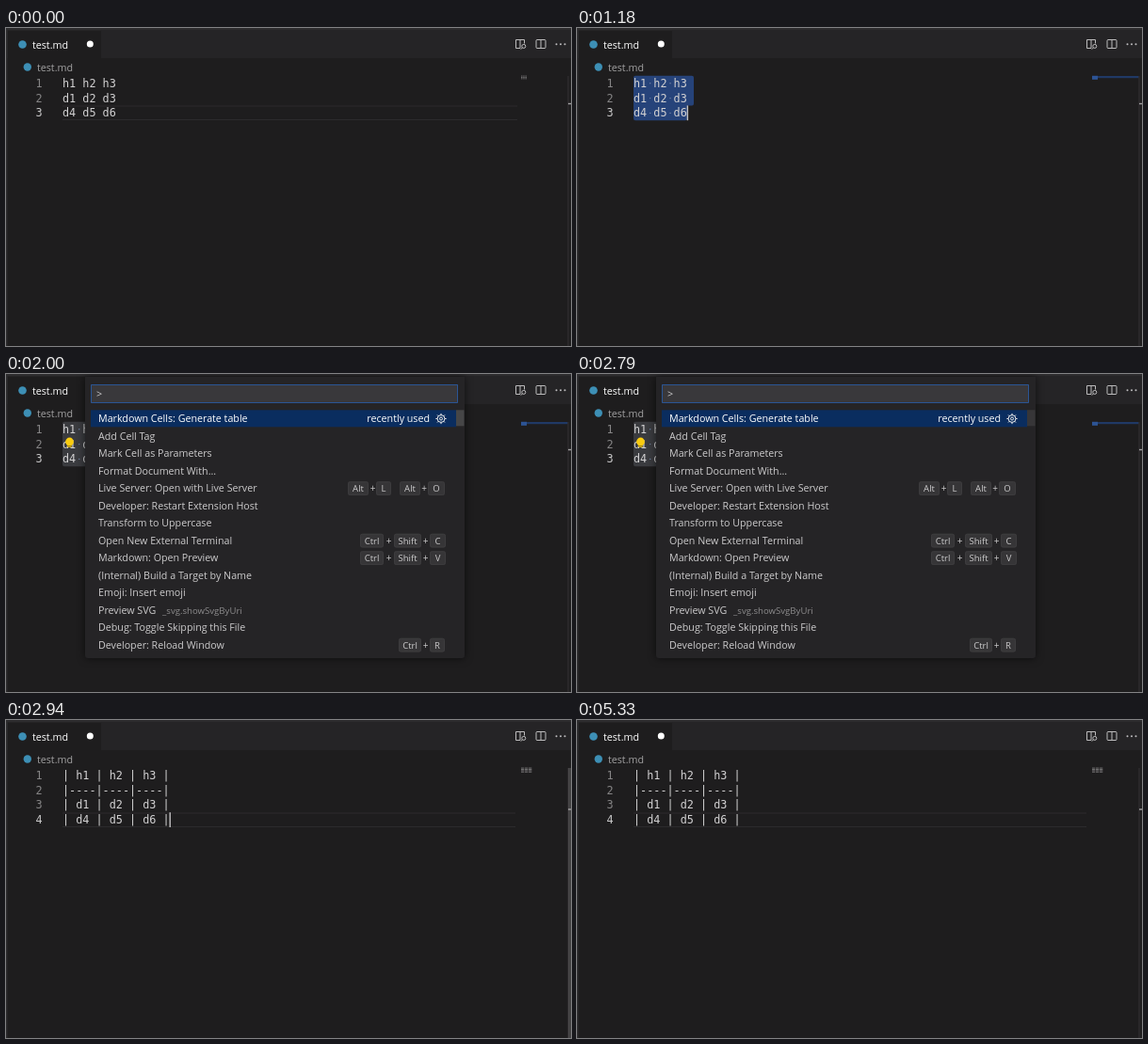
Write an HTML page with a canvas that moves like this. It is 600 px wide and 338 px high and loops after 5.36 s.

```html
<!DOCTYPE html>
<html lang="en">
<head>
<meta charset="utf-8">
<title>Markdown table from text</title>
<style>
  html, body { margin: 0; width: 100%; height: 100%; overflow: hidden; background: #1e1d1e; }
  canvas { display: block; width: 600px; height: 338px; }
</style>
</head>
<body>
<canvas id="stage" width="600" height="338"></canvas>
<script>
const ctx = document.getElementById('stage').getContext('2d');
const LOOP = 5360;
const UI = '"Open Sans", "Noto Sans", sans-serif';
const MONO = '11.8px "DejaVu Sans Mono", "Liberation Mono", monospace';
const LEFT = 60, TOP = 50.8, PITCH = 15.8, CHAR = 7.1;

// Moments of the story, in ms
const SELECT = 1180, BULB = 1910, OPEN = 2000, CLOSE = 2820, TABLE = 2860;
const CARET_ON = [[390, 880], [SELECT, 1700], [TABLE, 3360], [3880, 4360], [4880, 5330]];

const PLAIN = ['h1 h2 h3', 'd1 d2 d3', 'd4 d5 d6'];
const GRID = ['| h1 | h2 | h3 |', '|----|----|----|', '| d1 | d2 | d3 |', '| d4 | d5 | d6 |'];

const COMMANDS = [
  'Markdown Cells: Generate table', 'Add Cell Tag', 'Mark Cell as Parameters',
  'Format Document With...', 'Live Server: Open with Live Server',
  'Developer: Restart Extension Host', 'Transform to Uppercase',
  'Open New External Terminal', 'Markdown: Open Preview',
  '(Internal) Build a Target by Name', 'Emoji: Insert emoji', 'Preview SVG',
  'Debug: Toggle Skipping this File', 'Developer: Reload Window'
];
// Key caps per row: [label, left, width]
const KEYS = {
  4: [['Alt', 363, 22], ['L', 393, 16], ['Alt', 418, 22], ['O', 448, 18]],
  7: [['Ctrl', 376, 25], ['Shift', 412, 29], ['C', 450, 17]],
  8: [['Ctrl', 376, 25], ['Shift', 412, 29], ['V', 450, 17]],
  13: [['Ctrl', 417, 24], ['R', 450, 16]]
};
const PLUSES = { 4: [389.5, 444], 7: [406.5, 445.5], 8: [406.5, 445.5], 13: [445.5] };

const clamp = v => Math.max(0, Math.min(1, v));
const rowTop = i => TOP + PITCH * i;

function rect(x, y, w, h, color) {
  ctx.fillStyle = color;
  ctx.fillRect(x, y, w, h);
}

function box(x, y, w, h, color, r = 0) {
  ctx.strokeStyle = color;
  ctx.lineWidth = 1;
  ctx.beginPath();
  ctx.roundRect(x, y, w, h, r);
  ctx.stroke();
}

function disc(x, y, r, color) {
  ctx.fillStyle = color;
  ctx.beginPath();
  ctx.arc(x, y, r, 0, Math.PI * 2);
  ctx.fill();
}

function line(x1, y1, x2, y2, color) {
  ctx.strokeStyle = color;
  ctx.lineWidth = 1;
  ctx.beginPath();
  ctx.moveTo(x1, y1);
  ctx.lineTo(x2, y2);
  ctx.stroke();
}

function text(str, x, y, color, font, align = 'left') {
  ctx.font = font;
  ctx.textAlign = align;
  ctx.fillStyle = color;
  ctx.fillText(str, x, y);
}

const label = (str, x, y, color, size = 10.7, align) =>
  text(str, x, y, color, size + 'px ' + UI, align);

function drawFrame() {
  rect(0, 0, 600, 338, '#1e1d1e');
  rect(0, 3, 600, 29, '#252426');
  rect(2, 3, 99, 29, '#1e1d1e');
  rect(0, 0, 600, 2.5, '#2d2c2e');
  rect(0, 0, 1.5, 338, '#2d2c2e');

  disc(17.5, 17.5, 4.3, '#3d8fb5');
  label('test.md', 28, 21.5, '#ffffff');
  disc(89.3, 17, 3.5, '#ffffff');
  disc(22.8, 41.5, 4.2, '#3d8fb5');
  label('test.md', 33, 45.7, '#a2a1a2');

  const icon = '#bdbcbd';
  ctx.strokeStyle = icon;
  ctx.lineWidth = 1;
  ctx.beginPath();
  ctx.moveTo(546, 21.5);
  ctx.lineTo(541.5, 21.5);
  ctx.lineTo(541.5, 12.5);
  ctx.lineTo(550.5, 12.5);
  ctx.lineTo(550.5, 16.5);
  ctx.moveTo(546, 12.5);
  ctx.lineTo(546, 21.5);
  ctx.stroke();
  ctx.beginPath();
  ctx.arc(549.8, 19.4, 2, 0, Math.PI * 2);
  ctx.stroke();
  line(548.4, 20.9, 546.8, 22.6, icon);
  box(563, 12.5, 10, 9, icon, 1);
  line(568, 12.5, 568, 21.5, icon);
  for (const x of [584.5, 589, 593.5]) disc(x, 17.2, 1, icon);
}

function drawMinimap(selected, table) {
  if (selected) {
    rect(547, 51, 49.5, 2.2, '#203966');
    rect(547, 50.8, 6, 4, '#2d5495');
    return;
  }
  const groups = table ? 3 : 3;
  const step = table ? 4 : 2.2;
  for (let row = 0; row < (table ? 4 : 3); row++)
    for (let i = 0; i < groups; i++)
      rect(547 + i * step, 50.6 + row * 1.4, step - 0.7, 0.9, '#777677');
}

function drawScrollbar(t, last) {
  rect(596.5, 51, 1, 287, '#343335');
  const shown = clamp((t - TABLE) / 80) * (1 - clamp((t - 3420) / 750));
  if (shown > 0) rect(597, 51, 3, 287, `rgba(121,121,121,${0.4 * shown})`);
  rect(597, last === 3 ? 94.3 : 79.8, 3, 1.4, '#a3a2a3');
}

function drawBulb() {
  disc(67.5, 72, 4.4, '#f8cb10');
  rect(65, 75, 4.6, 2.8, '#f8cb10');
  rect(65, 76.2, 4.6, 0.6, '#6a5a20');
}

function drawEditor(t) {
  const table = t >= TABLE;
  const selected = t >= SELECT && !table;
  const away = t >= OPEN && t < CLOSE;
  const lines = table ? GRID : PLAIN;
  const last = lines.length - 1;

  if (selected) {
    const tint = away ? '#3a3b3f' : '#26437a';
    ctx.fillStyle = tint;
    ctx.beginPath();
    ctx.roundRect(LEFT, TOP, 64, PITCH * 2, [2, 2, 2, 0]);
    ctx.roundRect(LEFT, rowTop(2), 57, PITCH, [0, 0, 2, 2]);
    ctx.fill();
  } else {
    const end = table ? 541 : 543;
    const y = Math.round(rowTop(last));
    rect(LEFT, y + 0.5, end - LEFT, 1, '#2c2b2d');
    rect(LEFT, y + 15, end - LEFT, 1, '#2c2b2d');
  }

  lines.forEach((str, i) => {
    const base = rowTop(i) + 12;
    text(String(i + 1), 38.6, base, i === last ? '#c8c7c8' : '#858485', MONO, 'right');
    [...str].forEach((ch, k) => {
      const x = LEFT + k * CHAR;
      if (ch !== ' ') text(ch, x, base, '#d2d1d2', MONO);
      else if (selected) disc(x + CHAR / 2, base - 4, 0.7, '#7485a6');
    });
  });

  if (selected && t >= BULB) drawBulb();
  if (CARET_ON.some(([a, b]) => t >= a && t < b))
    rect(LEFT + lines[last].length * CHAR - 0.1, rowTop(last), 1.4, PITCH, '#c4c3c4');

  drawMinimap(selected, table);
  drawScrollbar(t, last);
}

function drawGear(x, y) {
  ctx.strokeStyle = '#f0f0f0';
  ctx.lineWidth = 1;
  ctx.beginPath();
  ctx.arc(x, y, 3.9, 0, Math.PI * 2);
  ctx.stroke();
  ctx.beginPath();
  ctx.arc(x, y, 1.5, 0, Math.PI * 2);
  ctx.stroke();
  for (let k = 0; k < 8; k++) {
    const c = Math.cos(k * Math.PI / 4), s = Math.sin(k * Math.PI / 4);
    line(x + c * 4, y + s * 4, x + c * 5.6, y + s * 5.6, '#f0f0f0');
  }
}

function drawKey([name, x, w], y) {
  ctx.fillStyle = '#363537';
  ctx.beginPath();
  ctx.roundRect(x, y - 7.2, w, 14.6, 2);
  ctx.fill();
  box(x + 0.5, y - 6.7, w - 1, 13.6, '#3d3c3e', 2);
  label(name, x + w / 2, y + 3.5, '#cccbcc', 9.5, 'center');
}

function drawPalette(t) {
  ctx.save();
  ctx.shadowColor = 'rgba(0,0,0,0.6)';
  ctx.shadowBlur = 8;
  ctx.fillStyle = '#252426';
  ctx.beginPath();
  ctx.roundRect(84, 3, 403, 299, [0, 0, 3, 3]);
  ctx.fill();
  ctx.restore();

  rect(90, 11, 390, 20, '#39383b');
  box(90.5, 11.5, 389, 19, '#2a5595');
  label('>', 96, 25, '#cccbcc');

  rect(90, 38.3, 388, 18, '#0a2d5f');
  const bar = 1 - clamp((t - 2420) / 800);
  rect(478, 38.3, 8.5, 17, `rgba(121,121,121,${0.4 * bar})`);

  COMMANDS.forEach((name, i) => {
    const y = 47.5 + i * 18.5;
    label(name, 98, y + 3.8, i ? '#cccbcc' : '#ffffff');
    (KEYS[i] || []).forEach(key => drawKey(key, y));
    (PLUSES[i] || []).forEach(x => label('+', x, y + 3.6, '#cccbcc', 10, 'center'));
  });
  label('recently used', 450, 51.3, '#ffffff', 10.7, 'right');
  drawGear(462, 47.5);
  label('_svg.showSvgByUri', 166, 254.6, '#8d8c8d', 9.6);
}

function render(t) {
  drawFrame();
  drawEditor(t);
  if (t >= OPEN && t < CLOSE) drawPalette(t);
}

const start = performance.now();
function tick() {
  render((performance.now() - start) % LOOP);
  requestAnimationFrame(tick);
}
tick();
</script>
</body>
</html>
```
